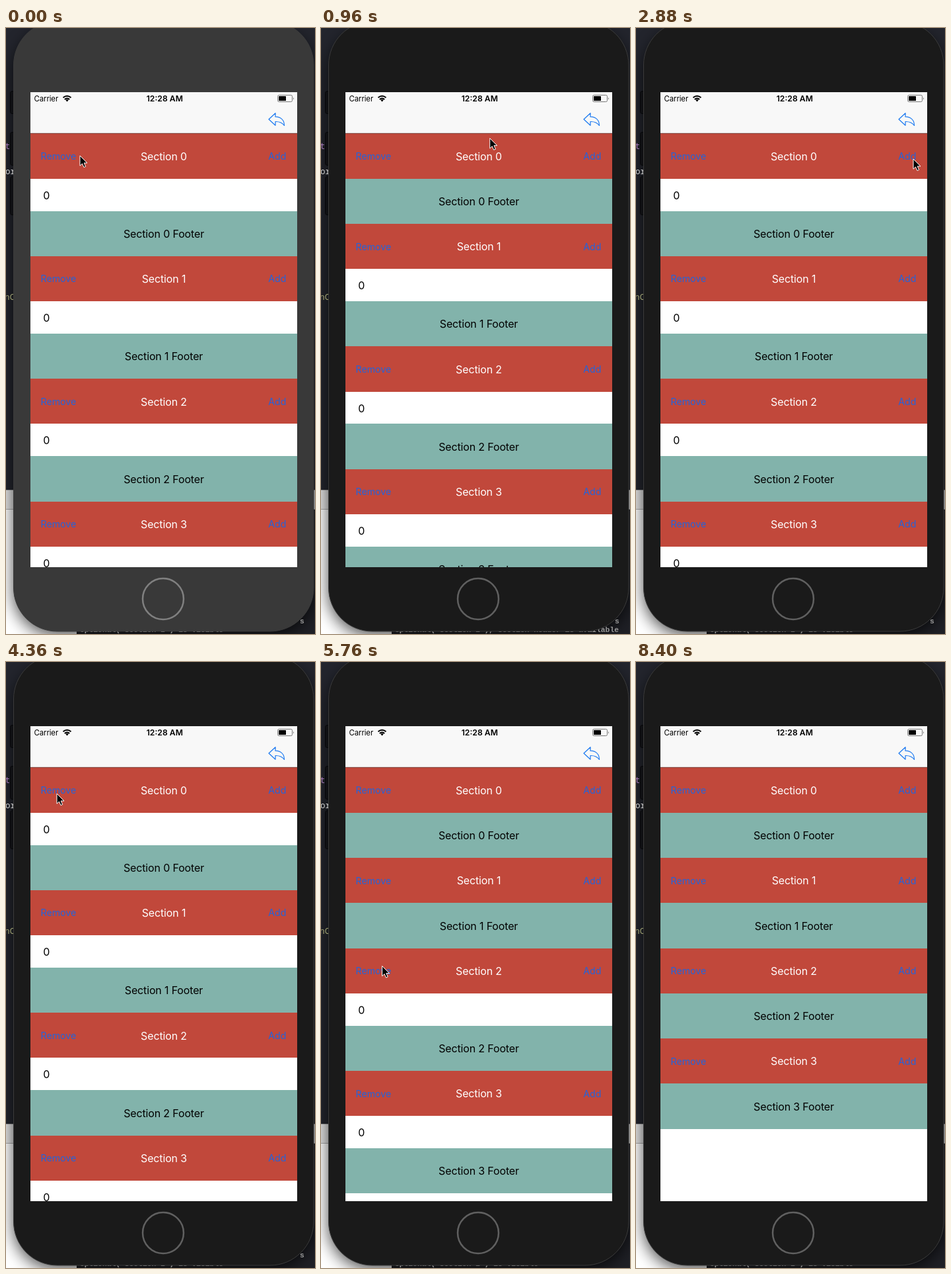
These frames come from a looping animation (468x916 px, 8.44 s). An HTML page:

```html
<!DOCTYPE html>
<html lang="en">
<head>
<meta charset="utf-8">
<style>
  html, body { margin: 0; width: 100%; height: 100%; overflow: hidden; background: #202229; }
  svg { display: block; width: 468px; height: 916px; font-family: Inter, Roboto, sans-serif; }
  .label { font-size: 16px; letter-spacing: -.15px; }
  .button { font-size: 14.2px; fill: #2563d9; }
  .carrier { font-size: 11.4px; letter-spacing: -.1px; }
  .clock { font-size: 12.2px; font-weight: 600; }
  .code { font: 12.5px "Noto Sans Mono", "DejaVu Sans Mono", monospace; }
  .log { font: bold 11.3px "Liberation Mono", monospace; fill: #999; }
</style>
</head>
<body>
<svg viewBox="0 0 468 916">
  <defs>
    <clipPath id="table"><rect x="37" y="159" width="404" height="656"/></clipPath>
    <filter id="soft" x="-15%" y="-10%" width="130%" height="120%"><feGaussianBlur stdDeviation="12"/></filter>
  </defs>

  <!-- desktop behind the phone -->
  <rect width="468" height="916" fill="#23252d"/>
  <g fill="#17181c" stroke="#08090b">
    <rect x="6.5" y="95.5" width="20" height="34" rx="3"/>
    <rect x="6.5" y="157.5" width="20" height="50" rx="3"/>
    <rect x="6.5" y="224.5" width="20" height="58" rx="3"/>
  </g>
  <rect y="698" width="468" height="218" fill="#fff"/>
  <rect y="698" width="468" height="30" fill="#e4e4e4"/>
  <path d="M0 698.5H468M0 727.5H468" stroke="#aaa"/>
  <path d="M107 728H468V916H107Z" fill="#1f2026"/>
  <rect x="11" y="2" width="456" height="916" rx="66" opacity=".7" filter="url(#soft)"/>
  <g class="code">
    <text x="-1.5" y="183" fill="#a678b8">t</text>
    <text x="-1" y="221" fill="#ccc">or</text>
    <text x="-2" y="411" fill="#a3a574">nC</text>
  </g>
  <text id="log" class="log" x="112" y="913"></text>
  <text id="tail" class="log" x="445" y="900">s</text>

  <!-- phone -->
  <rect id="body" x="11.5" y="-10" width="454.5" height="922" rx="66" stroke="#3b3b3b"/>
  <circle id="home" cx="238" cy="863" r="31" fill="none" stroke-width="2.5"/>
  <rect x="37" y="97" width="404" height="718" fill="#fff"/>
  <g id="list" clip-path="url(#table)"></g>
  <rect x="37" y="97" width="404" height="62" fill="#f8f8f8"/>
  <path d="M37 159.3H441" stroke="#69413d" stroke-width=".8"/>
  <text class="carrier" x="42.5" y="111">Carrier</text>
  <text class="clock" x="240.3" y="111" text-anchor="middle">12:28 AM</text>
  <g fill="none" stroke="#000" stroke-width="2">
    <path d="M86.5 105.3Q92.5 100.2 98.5 105.3M88.8 108Q92.5 104.8 96.2 108"/>
    <path d="M90.2 108.8Q92.5 107 94.8 108.8L92.5 111.5Z" fill="#000" stroke="none"/>
  </g>
  <rect x="411.5" y="101.5" width="22" height="10" rx="2" fill="none" stroke="#777"/>
  <rect x="413" y="103" width="11" height="7" rx=".6"/>
  <path d="M435 105Q437 106.6 435 108.4Z" fill="#777"/>
  <path d="M398 138L408 128.7V134.2C416.5 134.5 421.5 139.5 421.5 147.5C418 142.5 414 141.3 408 141.5V147.2Z"
    fill="none" stroke="#1a78f0" stroke-width="1.2" stroke-linejoin="round"/>

  <path id="cursor" d="M0 0V15.2L3.5 12L6 17.6L8.6 16.4L6.2 11H11Z" stroke="#fff"/>
</svg>

<script>
const LOOP = 8440, SLIDE = 300;
const TOP = 159.38, HEAD = 68.28, ROW = 48.85;
const REST = 200, SETTLE = 150, GLIDE = 1130;   // pointer: wait after a click, wait before one, longest trip

// Each click has a time, a pointer spot and a change of rows in one section.
// Going down the Remove buttons, the hand follows a slight bow to the right.
const remove = (at, n) => {
  const bow = Math.sin(n * Math.PI / 3);
  return { at, n, delta: -1, spot: [77 + 18 * bow, 199 + 133.3 * n - 7 * bow] };
};
const add = (at, n) => ({ at, n, delta: 1, spot: [420, 198] });
const undo = (at, { n, delta }) => ({ at, n, delta: -delta, spot: [409, 139] });
const leave = at => ({ at, delta: 0, spot: [-20, 850] });

const firstRemove = remove(330, 0), firstAdd = add(2980, 0);
const clicks = [
  firstRemove, undo(1500, firstRemove), firstAdd, undo(3680, firstAdd),
  remove(4500, 0), remove(5180, 1), remove(5900, 2), remove(6640, 3), leave(8530),
];

const $ = id => document.getElementById(id);
const clamp = v => Math.min(1, Math.max(0, v));
const ease = v => (v = clamp(v), v * v * (3 - 2 * v));
const mix = (a, b, k) => a + (b - a) * k;

const text = (x, y, str, cls, fill = '', anchor = 'middle') =>
  `<text x="${x}" y="${y}" class="${cls}" text-anchor="${anchor}" ${fill && `fill="${fill}"`}>${str}</text>`;
const band = color => `<rect x="37" width="404" fill="${color}"/>`;

$('list').innerHTML = [0, 1, 2, 3].map(n => `<g>
  ${[0, 1].map(i => text(56.3, HEAD + 31 + i * ROW, i, 'label', '#000', 'start')).join('')}
  <g>${band('#82b3ab')}${text(239, 40.4, `Section ${n} Footer`, 'label')}</g>
  <g>${band('#c1483b')}${text(239, 40.4, `Section ${n}`, 'label', '#fff')}
    ${text(52.5, 39.6, 'Remove', 'button', '', 'start')}${text(424.5, 39.6, 'Add', 'button', '', 'end')}</g>
</g>`).join('');
const sections = [...$('list').children];

const rowCount = (n, t) => clicks
  .filter(c => c.n === n)
  .reduce((sum, c) => sum + c.delta * ease((t - c.at) / SLIDE), 1);

function pointer(t) {
  let [x, y] = [112, 193], from = 0;
  for (const { at, spot } of clicks) {
    const end = at - SETTLE, begin = Math.max(from, end - GLIDE);
    const k = ease((t - begin) / (end - begin));
    x = mix(x, spot[0], k);
    y = mix(y, spot[1], k);
    from = at + REST;
  }
  return [x, y];
}

// Moves a group while its coloured band stays on whole pixels.
function place(group, y, offset) {
  const edge = Math.round(y + offset), rect = group.firstElementChild;
  group.setAttribute('transform', `translate(0 ${offset})`);
  rect.setAttribute('y', edge - y - offset);
  rect.setAttribute('height', Math.round(y + offset + HEAD) - edge);
}

function draw(t) {
  let y = TOP;
  sections.forEach((section, n) => {
    const count = rowCount(n, t), [row0, row1, footer, header] = section.children;
    section.setAttribute('transform', `translate(0 ${y})`);
    row0.setAttribute('opacity', clamp(count));
    row1.setAttribute('opacity', clamp(count - 1));
    place(header, y, 0);
    place(footer, y, HEAD + count * ROW);
    y += 2 * HEAD + count * ROW;
  });

  const lit = t < 40;
  $('body').setAttribute('fill', lit ? '#393939' : '#1a1a1a');
  $('home').setAttribute('stroke', lit ? '#808080' : '#606060');
  $('log').textContent = t > firstRemove.at && t < clicks[1].at
    ? 'Optional( section 1 ), section header is available'
    : 'Optional( section 1 ) is visible';
  $('tail').setAttribute('opacity', t < clicks[4].at ? 1 : 0);
  $('cursor').setAttribute('transform', `translate(${pointer(t)})`);
}

const start = performance.now();
function tick() {
  draw((performance.now() - start) % LOOP);
  requestAnimationFrame(tick);
}
tick();
</script>
</body>
</html>
```
